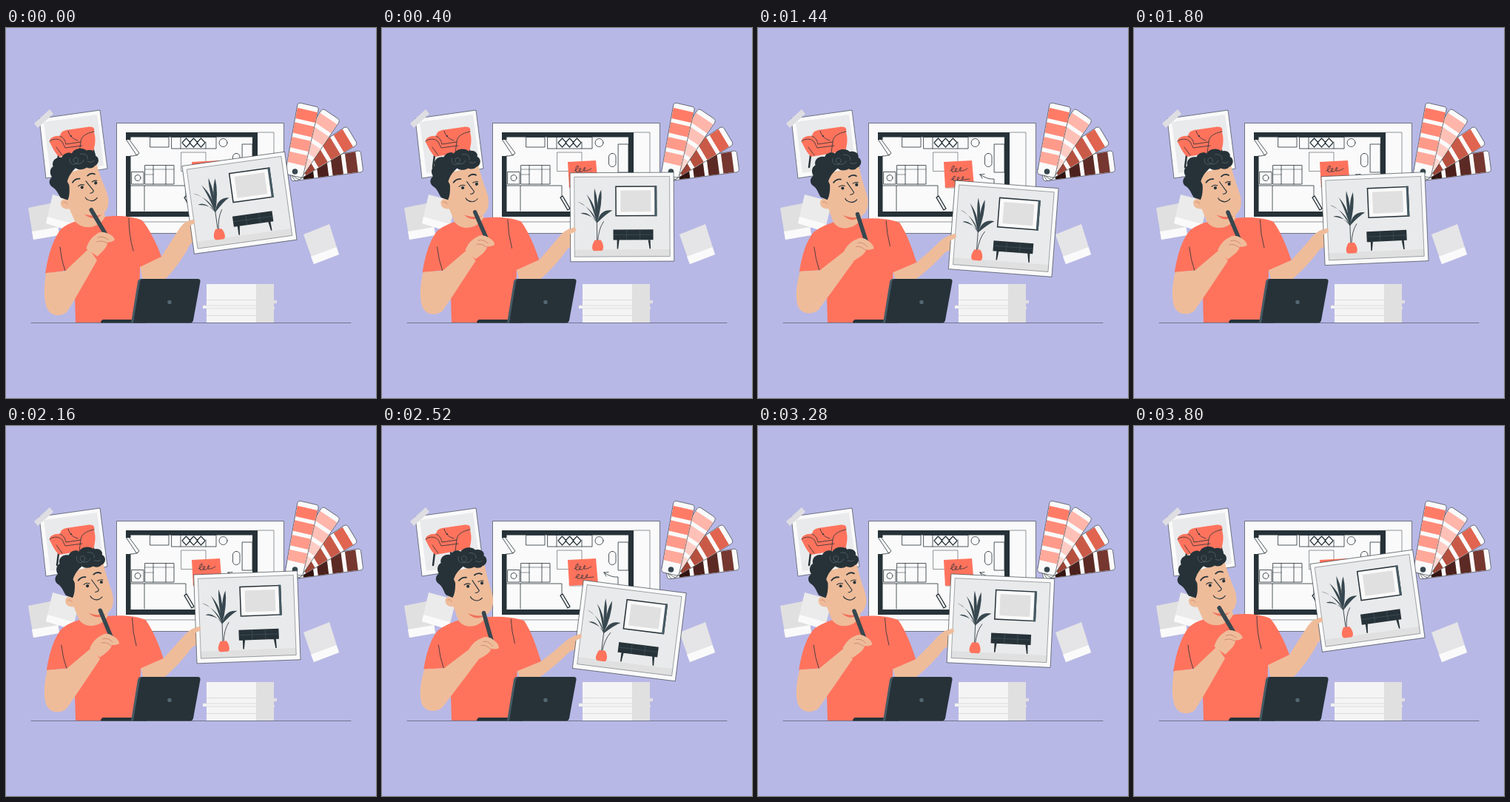
An HTML page for the animation above (3.88 s loop, 500 by 500 pixels).

```html
<!DOCTYPE html>
<html lang="en">
<head>
<meta charset="utf-8">
<title>Interior designer</title>
<style>
html, body { margin: 0; width: 100%; height: 100%; overflow: hidden; background: #b8b8e6; }
svg { display: block; width: 100vw; height: 100vh; }
.ln { fill: none; stroke: #263238; stroke-width: .8; stroke-linecap: round; stroke-linejoin: round; }
.thin { stroke-width: .5; }
.bold { stroke-width: 1.4; }
.sheet { fill: #fafafa; stroke: #263238; stroke-width: .6; }
.dark { fill: #263238; }
.coral { fill: #ff735d; }
.skin { fill: #efbc9a; }
.crease { fill: none; stroke: #c9846b; stroke-width: .8; }
.pale { fill: #e0e0e0; }
.note { fill: #e5e5e7; }
.wall { fill: #e9eaeb; }
.white { fill: #fafafa; }
</style>
</head>
<body>
<svg viewBox="0 0 500 500">
  <rect width="500" height="500" fill="#b8b8e6"/>

  <!-- pinned notes -->
  <path class="pale" d="M30,243L65,236L72,280L37,286Z"/>
  <path class="white" d="M35,275L70.500,269L72,280L37,286Z"/>
  <path fill="#ebebeb" d="M63,225L100,235L90,275L54,264Z"/>
  <path class="white" d="M56,255L92,265L90,275L54,264Z"/>
  <path class="note" d="M402,279L437,265L450,306L416,319Z"/>
  <path class="white" d="M412,309L446.500,296L450,306L416,319Z"/>

  <!-- armchair picture -->
  <path class="sheet" d="M45,122.500L127,111L137,190L54,203Z"/>
  <path class="wall" d="M51,127L123,117L132,186L60,196Z"/>
  <path class="ln" style="stroke-width:2.400" d="M71,172L69,188M118,165L121,178M93,171L94,180"/>
  <path class="coral" d="M73,146C74,139 79,138 88,137L112,133.500C119,133 120,136 119,141C122,150 120,160 118,166L72,174C66,169 63,162 59,154C58,148 67,145 73,146Z"/>
  <path class="ln" d="M73,146C78,148 80,152 81,157L101,154C101,147 108,142 119,140M59,153C64,149 72,149 76,154L80,162L103,159M68,161L76,172M101,154L99,169M84,139C86,146 90,150 97,152"/>
  <circle cx="88" cy="146" r="1" class="dark"/>
  <path fill="#dedee2" d="M38,129L59,110L64,116L43,135Z"/>

  <!-- floor plan -->
  <path class="sheet" d="M149.500,128.500H375.500V277.500H149.500Z"/>
  <path class="ln thin" d="M150,262H362V141H340"/>
  <path class="dark" d="M162,141H340V255H162V173H168.500V248H333V147.500H168.500V151H162Z"/>
  <path class="ln" d="M163,151L166,150L180,169L177,172ZM168,173Q175,173 178,171M195,147.500H220V161H195ZM224,147.500H284V163H224ZM236,147.500V163M270,163V154M319.500,157H333V195H319.500ZM170,194.500H186V211H170ZM188,185.500H227V211H188ZM199,185.500V211M216,185.500V211M168,213H243V228M187,213V247"/>
  <path class="ln" style="stroke-width:1.200" d="M238,155L243.500,149L249,155L243.500,161ZM248,155L253.500,149L259,155L253.500,161ZM258,155L263.500,149L269,155L263.500,161Z"/>
  <path class="ln thin" d="M237,168H270V193.500H237ZM188,191H227M188,198H199"/>
  <circle class="ln" cx="293.500" cy="155" r="5.500"/>
  <circle class="ln" cx="178" cy="202.500" r="4"/>
  <rect class="ln" x="306.500" y="169.500" width="9.500" height="18" rx="4.500"/>
  <path class="ln bold" d="M241,229L244,227L254,244L251,246Z"/>
  <path class="ln" d="M300,198Q310,205 319,204V216M300,198L306,197.500M300,198L303,203"/>
  <path fill="#c9c9ce" d="M252,213L293,211L291,217L254,217Z"/>
  <path class="coral" d="M251,181L289,179L292,213.500L253,216Z"/>
  <path class="ln" d="M260,193Q266,190 265,186Q261,187 262,194Q267,196 269,190Q265,188 267,194Q272,195 275,189Q272,187 273,193Q277,194 283,190M261,205Q268,203 266,200Q261,202 264,206Q270,207 272,202Q268,200 270,206Q276,207 278,201Q275,200 276,205L286,204"/>

  <g id="swatches"></g>

  <!-- paper stack -->
  <path fill="#f4f4f5" d="M271,346H338V398H271Z"/>
  <path class="pale" d="M338,346H362V398H338Z"/>
  <path fill="#f4f4f5" d="M266,375H338V379H266Z"/>
  <path class="pale" d="M338,368H366V372H338ZM338,377H363V380H338Z"/>
  <path fill="none" stroke="#d6d6d8" stroke-width=".8" d="M271,367.500H338M266,375H338M271,379H338M271,388.500H338"/>

  <path class="ln thin" d="M34,398.500H466"/>

  <path id="reach" class="skin"/>

  <g id="photo">
    <path class="sheet" d="M-70,-60H70V60H-70Z"/>
    <path class="wall" d="M-64,-54.500H64.500V53.500H-64Z"/>
    <path class="pale" d="M-64,44H64.500V53.500H-64Z"/>
    <path class="ln" style="stroke-width:.4" d="M-64,-54.500H64.500V53.500H-64Z"/>
    <path class="dark" d="M-9,-42H47V-1H-9Z"/>
    <path fill="#455a64" d="M44,-42H47V-1H44Z"/>
    <path class="white" d="M-7.500,-40.500H44V-2.500H-7.500Z"/>
    <path class="pale" d="M-2,-36H39V-7H-2Z"/>
    <path class="dark" d="M-12,17H42V31H-12ZM-7,31H-4L-5.500,43H-7ZM35,31H38L38.500,43H37Z"/>
    <path d="M6,17V31M24,17V31M-12,24H42" fill="none" stroke="#455a64" stroke-width=".6"/>
    <g id="leaves" fill="#37474f"></g>
    <path class="ln" d="M-34,33L-34,4M-33,33Q-32,16 -25,6"/>
    <path class="coral" d="M-37,31H-29C-24,38 -25,45 -28,45.500H-38C-42,44 -41,37 -37,31Z"/>
  </g>
  <path id="thumb" fill="none" stroke="#efbc9a" stroke-width="6" stroke-linecap="round"/>

  <!-- person -->
  <path id="shirt" class="coral"/>
  <path id="folds" class="ln"/>
  <path id="neck" class="skin"/>
  <g id="head">
    <path fill="#f0705a" d="M118,253Q130,266 143,255Z"/>
    <path class="skin" d="M100,196L142,188C144,200 147,211 151,225C155,239 152,252 142,256C130,260 113,253 104,243C96,246 88,243 88,236C88,230 95,229 98,232Z"/>
    <path class="dark" d="M80,213C74,209 75,202 80,199C76,192 80,186 83,185C81,176 90,172 96,174C99,168 107,167 110,170C114,163 126,163 130,168C139,166 143,173 141,176C147,179 146,188 139,190C137,193 131,193 128,191C123,194 116,193 113,190C107,195 103,199 100,207L102,212C102,220 101,227 98,232C94,230 91,229 89,228C86,223 85,217 80,213Z"/>
    <path fill="none" stroke="#65757c" stroke-width=".6" d="M107,176C104,184 113,188 117,182C120,177 113,173 111,179C111,186 123,187 125,180M121,172C128,171 132,175 130,180M130,183Q135,186 139,183"/>
    <path class="ln" style="stroke-width:1.800" d="M107,209Q111,204 117,205M128,202Q133,198 138,201"/>
    <circle class="dark" cx="119" cy="217" r="2.100"/>
    <circle class="dark" cx="138" cy="213" r="2.100"/>
    <path class="ln" style="stroke-width:1.100" d="M114,215Q118,212 122,214M133,211Q136,209 140,210M125,209L134,223Q133,226 129,226M123,233Q131,240 138,233M122,231L124,234"/>
    <path class="crease" d="M91,235Q95,233 97,238"/>
  </g>
  <path id="bend" class="skin"/>
  <g id="hand">
    <path d="M142.500,254.500L152,297" stroke="#37474f" stroke-width="5.500" stroke-linecap="round"/>
    <path class="skin" d="M120,302C126,294 131,290 139,288C145,285 151,289 154,292C158,295 161,300 160,303Q155,305 150,303C147,310 139,313 131,317Z"/>
    <path class="crease" d="M139,293Q147,292 152,300M136,298Q143,297 149,304"/>
  </g>

  <!-- laptop -->
  <path class="dark" d="M131,394H190V398.500H128Q128,395 131,394Z"/>
  <path fill="#455a64" d="M182,339H190L180,398.500H169L178,343Q179,339 182,339Z"/>
  <path class="dark" d="M185,339H259Q263,339 262.500,343L253,395Q252,398.500 249,398.500H172L181,343Q182,339 185,339Z"/>
  <circle cx="221" cy="370.500" r="2.800" fill="#53666f"/>
</svg>
<script>
const $ = id => document.getElementById(id);
const lerp = (a, b, p) => a + (b - a) * p;

// fan of colour cards, back to front; each narrows towards the pin
const cards = [
  [82.5, ['#75372f', '#5c2a25', '#4c211d', '#321512']],
  [59, ['#e0644f', '#c95a48', '#b5503f', '#9c4436']],
  [34, ['#ffb5aa', '#ffc1b7', '#ffccc4', '#ffd7d0']],
  [13, ['#ff7b66', '#ff8a78', '#ff9a8a', '#ffa99b']]
];
const left = y => -16 + (y + 91) * .046;
const band = (c, i) => {
  const y = -85 + i * 20, end = y + 14.5;
  return `<path fill="${c}" d="M${left(y)},${y}H12V${end}H${left(end)}Z"/>`;
};
$('swatches').innerHTML = cards.map(([angle, tones]) =>
  `<g transform="translate(390 194) rotate(${angle})">
    <path class="sheet" d="M-16.500,-88Q-16.500,-92 -12.500,-92H8.500Q12.500,-92 12.500,-88V2Q12.500,6 8.500,6H-8Q-12,6 -12,2Z"/>
    ${tones.map(band).join('')}
  </g>`).join('') + '<circle cx="390.500" cy="194" r="3.800" fill="#37474f"/>';

// leaves grow from one base: tip x, tip y, sideways bend
const leaf = ([x, y, bend]) => {
  const mx = (x - 34) / 2 + bend, my = (y + 6) / 2 - 7;
  return `<path d="M-34,8Q${mx - 3.5},${my - 3} ${x},${y}Q${mx + 5},${my + 4} -34,8Z"/>`;
};
$('leaves').innerHTML = [[-60, -21, 4], [-56, -5, 2], [-48, -31, 2], [-37, -39, 0],
  [-28, -37, 0], [-13, -9, -3]].map(leaf).join('');

// each shape has a leaning-left and a leaning-right pose
const poses = {
  shirt: [
    'M53,332C57,305 64,285 74,272C82,265 92,261 104,259L135,255C150,253 170,254 184,260C194,272 204,292 210,309L181,323L180,398L94,398L92,330L80,328Z',
    'M57,328C61,305 66,289 76,277C86,270 97,265 108,262L142,259C160,258 180,259 194,264C204,280 210,300 216,320L183,333L181,398L94,398L92,328L85,327Z'],
  folds: [
    'M73,296Q75,314 80,328M166,257Q166,280 172,301',
    'M77,296Q79,313 84,327M176,262Q177,276 181,292'],
  neck: [
    'M82,236L93,261C104,274 126,271 134,255L130,238Z',
    'M97,238L105,262C112,276 133,273 142,259L146,242Z'],
  bend: [
    'M54,331C51,350 51,366 55,378C61,391 75,390 82,384C94,366 108,340 123,314L112,298L80,328.500Z',
    'M58,328C52,345 50,361 53,374C59,387 73,386 81,380C93,365 110,344 132,316L121,301L85,327Z'],
  reach: [
    'M181,322L210,309Q222,290 235,270Q243,259 256,258L262,280Q256,288 249,292Q236,318 214,341L185,342Z',
    'M183,332L216,320Q234,309 250,296Q260,288 273,285L276,300Q266,302 254,308Q234,326 210,341L187,342Z'],
  thumb: ['M242,267L252,262', 'M261,294L270,289']
};
const num = /-?[\d.]+/g;
const mix = ([a, b], p) => {
  const to = b.match(num);
  let i = 0;
  return a.replace(num, n => lerp(+n, +to[i++], p).toFixed(2));
};

// sine easing between turning points; the middle swing is shallower
const times = [0, 930, 1990, 2820, 3800];
const swing = (t, dip) => {
  const v = [0, 1, dip, 1, 0];
  const i = Math.min(3, times.findLastIndex(k => k <= t));
  const u = (t - times[i]) / (times[i + 1] - times[i]);
  return lerp(v[i], v[i + 1], (1 - Math.cos(Math.PI * u)) / 2);
};

function pose(t) {
  const p = swing(t, .39), tilt = swing(t, .22), back = 1 - p;
  for (const id in poses) $(id).setAttribute('d', mix(poses[id], p));
  $('photo').setAttribute('transform',
    `translate(${lerp(315.5, 338.3, p)} ${lerp(236.3, 285.2, p)}) rotate(${lerp(-7.9, 11.5, tilt)})`);
  $('head').setAttribute('transform', `translate(${-14 * back} ${back}) rotate(${-6 * back} 93 237)`);
  $('hand').setAttribute('transform', `translate(${-15.5 * back} ${-13 * back}) rotate(${-18 * back} 150 294)`);
}

function tick() {
  const t = performance.now() % 3880;
  pose(Math.min(3800, Math.floor(t / 40) * 40));
  requestAnimationFrame(tick);
}
tick();
</script>
</body>
</html>
```
